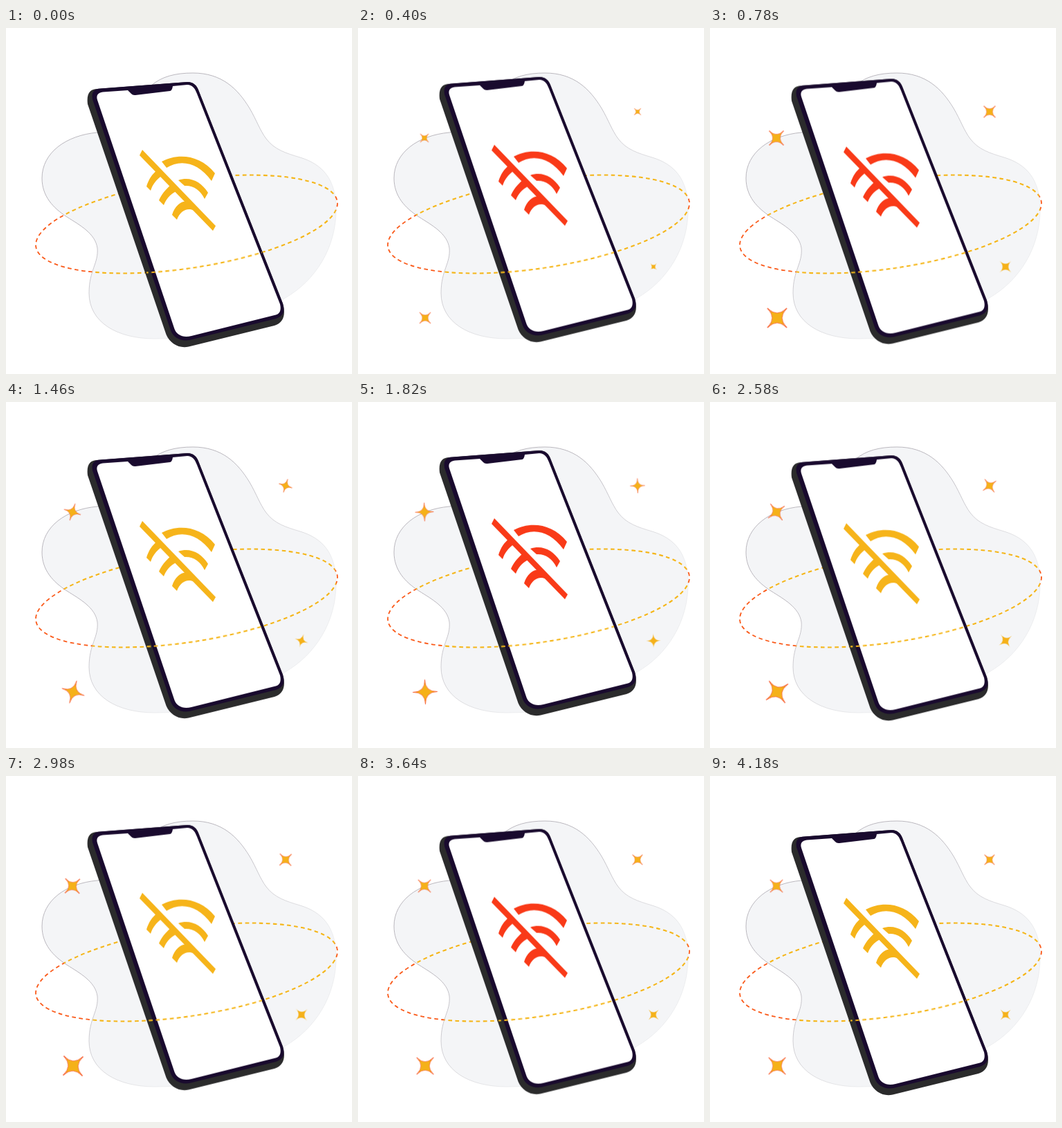
Recreate the animation shown at these times as an HTML page. Size 500x500 px, loop 4200 ms.

```html
<!DOCTYPE html>
<html lang="en">
<head>
<meta charset="utf-8">
<title>No connection</title>
<style>
  html, body { margin: 0; width: 100%; height: 100%; overflow: hidden; background: #fff; }
  svg { display: block; width: 100%; height: 100%; }

  .phone, .orbit { animation: bob 4.2s cubic-bezier(.37, 0, .63, 1) infinite; }
  .orbit {
    fill: none;
    stroke: #f5b619;
    stroke-width: 2.1;
    stroke-dasharray: 5.6 4.4;
    animation-name: flow;
  }
  .orbit.hot { stroke: #fa5a1a; stroke-width: 1.8; }
  .wifi { animation: blink 1.4s step-end infinite; }
  .star path { animation: twinkle 4.2s ease-in-out infinite; }
  .star { fill: #f5b119; stroke: #f6481a; }
  .star.plain { stroke: none; }

  @keyframes bob {
    0%, 26.67%, 58.1%, 91.4%, 100% { transform: translateY(0); }
    11.9%, 42.62%, 74.3% { transform: translateY(-8px); }
  }
  @keyframes flow {
    0%, 26.67%, 58.1%, 91.4%, 100% { stroke-dashoffset: -2; }
    11.9%, 42.62%, 74.3% { stroke-dashoffset: 5; }
  }
  @keyframes blink {
    0%, 75% { fill: #f6b41a; }
    25% { fill: #f93a18; }
  }
  @keyframes twinkle {
    0%, 2% { transform: rotate(45deg) scale(0); }
    16%, 18.57% { transform: rotate(45deg) scale(1); animation-timing-function: linear; }
    34.76% { transform: rotate(18deg) scale(.84); animation-timing-function: linear; }
    51.43% { transform: rotate(-20deg) scale(.93); animation-timing-function: ease-out; }
    70.95% { transform: rotate(-43deg) scale(1); }
    86.67%, 100% { transform: rotate(-45deg) scale(.86); }
  }
</style>
</head>
<body>
<svg viewBox="0 0 500 500">
  <defs>
    <path id="blob" d="M270 65C312 65 335 88 352 116C362 133 367 148 376 160C388 176 405 181 425 187C458 197 477 219 477 262C477 317 448 365 402 391C350 425 300 449 215 449C160 449 120 425 120 383C120 350 134 340 132 318C129 297 107 285 88 273C68 260 52 243 52 217C52 180 87 155 132 151C165 146 180 110 210 83C225 70 245 65 270 65Z"/>
    <ellipse id="ring" cx="261" cy="283.5" rx="220.2" ry="63.7" pathLength="950" transform="rotate(-8.55 261 283.5)"/>
    <path id="spark" d="M0-1Q0 0 1 0Q0 0 0 1Q0 0-1 0Q0 0 0-1Z" stroke-width=".04" stroke-linejoin="round"/>
    <linearGradient id="rim" x1="0" y1="0" x2="1" y2="1">
      <stop offset=".35" stop-color="#aaa6ae"/>
      <stop offset=".7" stop-color="#e9eaec"/>
    </linearGradient>
    <clipPath id="inBlob"><use href="#blob"/></clipPath>
    <mask id="offBlob" maskUnits="userSpaceOnUse" x="0" y="0" width="500" height="500">
      <path fill="#fff" d="M0 0H500V500H0Z"/>
      <use href="#blob"/>
    </mask>
    <clipPath id="front"><path d="M203 300H370V370H203Z"/></clipPath>
  </defs>

  <use href="#blob" fill="#f4f5f7" stroke="url(#rim)" stroke-width=".8"/>

  <!-- the ring turns redder where it leaves the blob -->
  <g mask="url(#offBlob)"><use href="#ring" class="orbit hot"/></g>
  <g clip-path="url(#inBlob)"><use href="#ring" class="orbit"/></g>

  <g class="phone">
    <path fill="#2b2b2c" d="M118 110C116 94 122 88 132 88L262 78C271 78 276 83 279 92L400 398C405 416 400 426 388 430L264 460.500C250 463.500 237 456 231.500 443Z"/>
    <path fill="#190a2e" d="M125 103C123 92 128 88 136 87.500L262 78C271 78 276 83 279 92L400 398C404 411 400 416 390 420L265 451C253 453 242 448 238 437Z"/>
    <path fill="#fff" d="M132 104C130 97 133 93.500 140 92.500L176 90L181 95Q183 97.500 187 97L237 91Q240 90.500 241 84L262 82C269 82 273 87 276 95L396 399C398 407 396 413 390 414.500L268 445C256 448 247 444 243.500 435Z"/>
    <g class="wifi">
      <path d="M197 176L303 286L299 293L193 184Z"/>
      <path d="M225 193C247 181 280 182 302 210L297 221C278 194 252 189 232 202Z"/>
      <path d="M249 220C266 214 282 222 292 238L287 247C281 234 270 227 258 228Z"/>
      <path d="M240 270C246 251 262 244 275 258L272 264C262 259 252 264 247 277Z"/>
      <path d="M203 229C206 219 211 211 219 205L226 213C217 219 212 226 209 235Z"/>
      <path d="M221 249C225 240 230 234 238 227L246 236C237 240 231 248 228 256Z"/>
    </g>
  </g>

  <g clip-path="url(#front)"><use href="#ring" class="orbit"/></g>

  <g id="stars"></g>
</svg>
<script>
  const NS = "http://www.w3.org/2000/svg";
  const stars = document.getElementById("stars");
  const spark = document.getElementById("spark");

  function addStar(x, y, size, plain) {
    const g = document.createElementNS(NS, "g");
    g.setAttribute("class", plain ? "star plain" : "star");
    g.setAttribute("transform", `translate(${x} ${y}) scale(${size})`);
    const shape = spark.cloneNode();
    shape.removeAttribute("id");
    g.append(shape);
    stars.append(g);
  }

  addStar(96, 159, 15);
  addStar(404, 121, 12);
  addStar(427, 345, 12, true);
  addStar(97, 419, 20);
</script>
</body>
</html>
```
